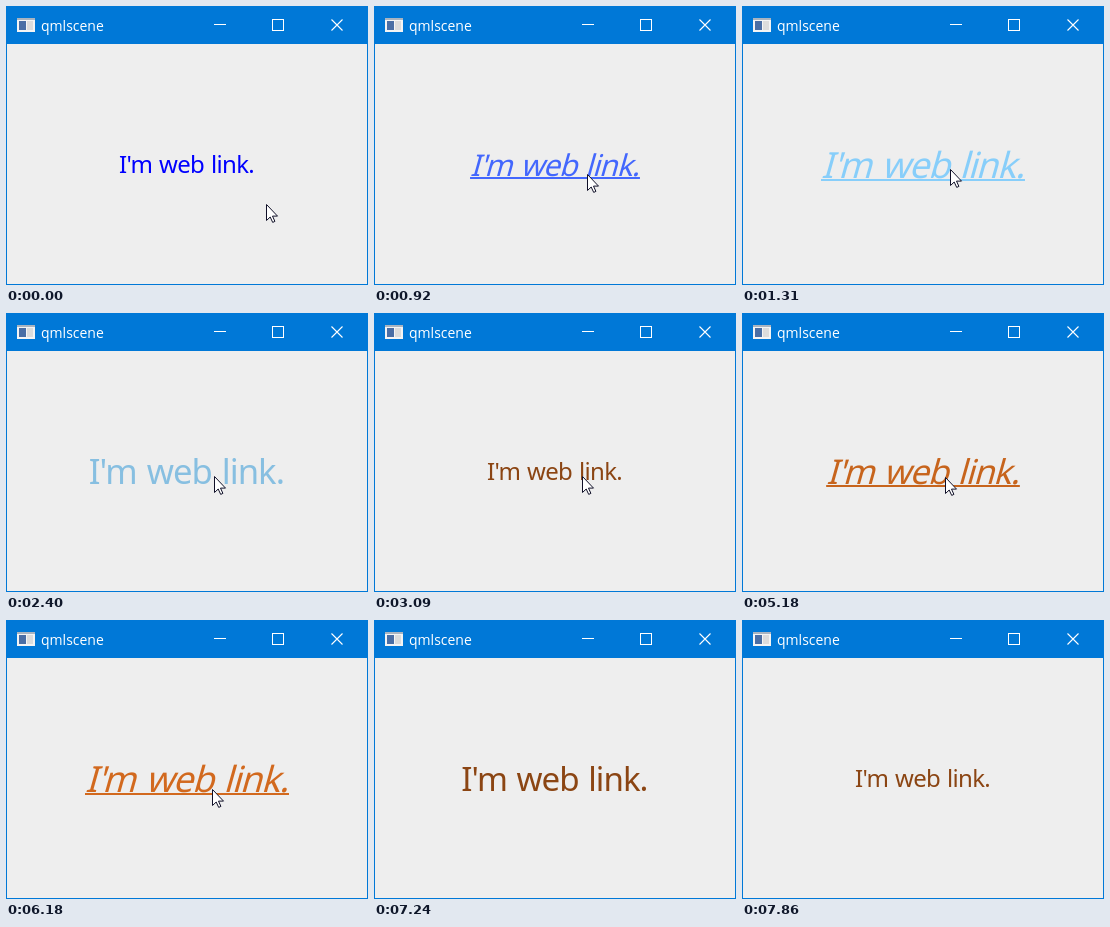
Recreate the animation shown at these times as an HTML page with a canvas. Size 362 by 279 pixels, loop 8.16 s.

```html
<!DOCTYPE html>
<html lang="en">
<head>
<meta charset="utf-8">
<title>qmlscene</title>
<style>
  html, body { margin: 0; width: 100%; height: 100%; overflow: hidden; background: #eee; }
  canvas { display: block; }
</style>
</head>
<body>
<canvas id="stage" width="362" height="279"></canvas>
<script>
const ctx = document.getElementById('stage').getContext('2d');
const LOOP = 8160, LINK_WIDTH = 136;
const BLUE = [0, 0, 255], SKY = [135, 206, 250], BROWN = [139, 69, 19], CHOCOLATE = [210, 105, 30];

// Each state eases in from the one before it.
const states = [
  { at: -2000, scale: 1, color: BLUE },
  { at: 215, scale: 1.5, color: SKY },
  { at: 2070, scale: 1, color: BROWN },
  { at: 4260, scale: 1.5, color: CHOCOLATE },
  { at: 6750, scale: 1, color: BROWN, fade: 450 }
];
const hovers = [[215, 2250], [4330, 6770]];
const press = [2080, 2250];

// Pointer stops: time, x, y
const pointer = [
  [0, 260, 198], [80, 260, 198], [240, 241, 180], [500, 222, 171], [920, 213, 168],
  [1310, 208, 163], [3500, 208, 163], [3950, 239, 200], [4260, 239, 200],
  [4400, 214, 173], [4560, 203, 164], [6020, 203, 164], [6180, 206, 169],
  [6560, 216, 180], [6790, 240, 230], [6950, 257, 280], [LOOP, 257, 280]
];

const mix = (a, b, k) => a + (b - a) * k;
const within = (t, [from, to]) => t >= from && t < to;
const inQuad = (elapsed, duration) => Math.min(1, elapsed / duration) ** 2;

function rect(color, x, y, w, h) {
  ctx.fillStyle = color;
  ctx.fillRect(x, y, w, h);
}

function drawWindow() {
  rect('#0078d7', 0, 0, 362, 279);
  rect('#eee', 1, 38, 360, 240);

  rect('#f4f4f4', 11, 12, 18, 14);
  rect('#a9b4c0', 11, 12, 18, 2);
  rect('#4a6ea5', 13, 15, 7, 9);
  rect('#dcdcdc', 21, 15, 6, 9);

  ctx.fillStyle = '#fff';
  ctx.font = '14px "Open Sans", "Noto Sans", sans-serif';
  ctx.letterSpacing = ctx.wordSpacing = '0px';
  ctx.fillText('qmlscene', 35, 25);

  rect('#fff', 208, 18, 12, 1);
  ctx.strokeStyle = '#fff';
  ctx.lineWidth = 1;
  ctx.strokeRect(266.5, 13.5, 11, 11);
  ctx.lineWidth = 1.1;
  ctx.stroke(new Path2D('M325.5 13.5l11 11m0-11l-11 11'));
}

function drawLink(t) {
  const i = states.findLastIndex(s => t >= s.at);
  const now = states[i], before = states[i - 1] || now;
  const elapsed = t - now.at;
  const scale = mix(before.scale, now.scale, inQuad(elapsed, 1000));
  const fade = inQuad(elapsed, now.fade || 1000);
  const color = `rgb(${now.color.map((c, n) => Math.round(mix(before.color[n], c, fade)))})`;
  const hovered = hovers.some(span => within(t, span));

  ctx.save();
  ctx.translate(181, 158 + 9.3 * scale);
  ctx.scale(scale, scale);
  if (hovered) ctx.transform(1, 0, -0.28, 1, 0, 0);
  ctx.fillStyle = color;
  ctx.font = '24px "Noto Sans", sans-serif';
  ctx.letterSpacing = '-0.7px';
  ctx.wordSpacing = '1.4px';
  ctx.fillText("I'm web link.", -LINK_WIDTH / 2, 0);
  ctx.restore();

  if (hovered) {
    const width = LINK_WIDTH * scale;
    rect(color, 181 - width / 2, Math.round(157.5 + 10.5 * scale), width, 2);
  }
}

const arrow = new Path2D('M.5.5V16.5L4.2 13 6.7 18.4 8.9 17.4 6.5 12.1H11.5Z');

function drawPointer(t) {
  const i = pointer.findIndex(p => p[0] > t);
  const [t0, x0, y0] = pointer[i - 1], [t1, x1, y1] = pointer[i];
  const k = (t - t0) / (t1 - t0);
  ctx.save();
  ctx.translate(Math.round(mix(x0, x1, k)), Math.round(mix(y0, y1, k)));
  ctx.lineWidth = 1;
  ctx.strokeStyle = '#101028';
  if (within(t, press)) {
    ctx.beginPath();
    ctx.arc(0, 0, 14.5, 0, Math.PI * 2);
    ctx.stroke();
  }
  ctx.fillStyle = '#fff';
  ctx.fill(arrow);
  ctx.stroke(arrow);
  ctx.restore();
}

const start = performance.now();

function frame() {
  const t = (performance.now() - start) % LOOP;
  drawWindow();
  drawLink(t);
  drawPointer(t);
  requestAnimationFrame(frame);
}
frame();
</script>
</body>
</html>
```
